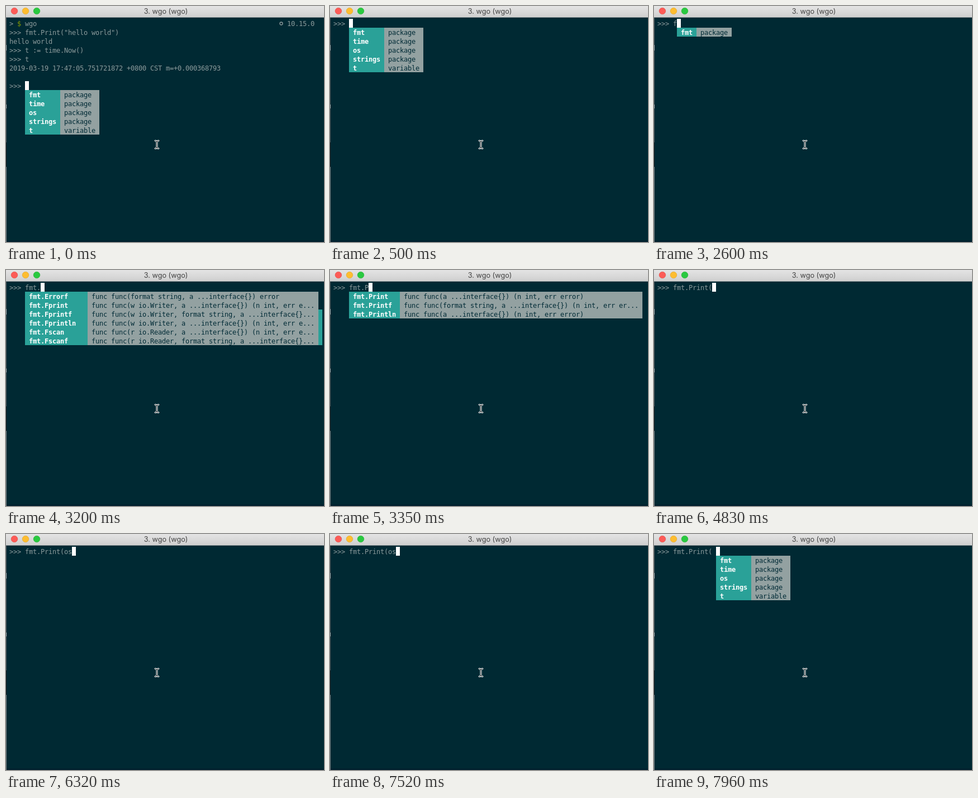
An HTML page that plays this animation: 569 px wide and 424 px high, repeating every 8000 ms.

```html
<!DOCTYPE html>
<html lang="en">
<head>
<meta charset="utf-8">
<title>wgo</title>
<style>
  html, body { margin: 0; width: 100%; height: 100%; overflow: hidden; background: #002933; }
  svg { display: block; }
  #screen text { font: 12px "DejaVu Sans Mono", "Liberation Mono", monospace; white-space: pre; }
  #screen .bold { font-weight: bold; }
  #title { font: 12.7px Inter, "Liberation Sans", sans-serif; }
</style>
</head>
<body>
<svg width="569" height="424" viewBox="0 0 569 424">
  <defs>
    <linearGradient id="bar" x2="0" y2="1">
      <stop stop-color="#e4e4e4"/><stop offset="1" stop-color="#cfcfcf"/>
    </linearGradient>
  </defs>
  <rect width="569" height="424" fill="#002933"/>
  <rect y="421" width="569" height="3" fill="#02212e"/>
  <g id="edge">
    <rect y="20" width="1" height="225" fill="#4c5357"/>
    <rect y="245" width="1" height="44" fill="#15191b"/>
    <rect y="289" width="1" height="135" fill="#7d8486"/>
    <path d="M.5 70v10M.5 177v7" stroke="#b4b8b9"/>
  </g>
  <rect width="569" height="20" fill="url(#bar)"/>
  <rect y="20" width="569" height="1" fill="#7f8a8d"/>
  <g stroke-width=".6">
    <circle cx="15" cy="9" r="5.8" fill="#fc5b57" stroke="#e0443e"/>
    <circle cx="35" cy="9" r="5.8" fill="#fdbd30" stroke="#dea123"/>
    <circle cx="55" cy="9" r="5.8" fill="#29c940" stroke="#1aab29"/>
  </g>
  <text id="title" x="286" y="14" text-anchor="middle" fill="#434343">3. wgo (wgo)</text>
  <g id="screen"></g>
  <g id="pointer" fill="none" stroke-linecap="round">
    <path id="beam" d="M267 242q3 0 3 2.500q0-2.500 3-2.500M270 244.500v9M267 256q3 0 3-2.500q0 2.500 3 2.500" stroke="#fff" stroke-width="2.600"/>
    <use href="#beam"/>
    <path d="M267 242q3 0 3 2.500q0-2.500 3-2.500M270 244.500v9M267 256q3 0 3-2.500q0 2.500 3 2.500" stroke="#10181b" stroke-width="1"/>
  </g>
</svg>
<script>
const LOOP = 8000, CELL_W = 7, CELL_H = 16, LEFT = 6, TOP = 23, COLUMNS = 79;
const GRAY = '#93a1a1', TEAL = '#2aa198', INK = '#002b36', WHITE = '#fff', TEXT = '#8c9b9c';
const screen = document.getElementById('screen');

const px = col => LEFT + col * CELL_W;
const py = row => TOP + row * CELL_H;
const longest = list => Math.max(...list.map(s => s.length));
const escapeText = s => s.replace(/&/g, '&amp;').replace(/</g, '&lt;').replace(/>/g, '&gt;');

function block(col, row, cols, rows, color) {
  return `<rect x="${px(col)}" y="${py(row)}" width="${cols * CELL_W}" height="${rows * CELL_H}" fill="${color}"/>`;
}

// Each character sits on its own terminal cell.
function write(col, row, string, color = TEXT, style = '') {
  const xs = [...string].map((_, i) => px(col + i)).join(' ');
  return `<text class="${style}" x="${xs}" y="${py(row) + 13}" fill="${color}">${escapeText(string)}</text>`;
}

function menu(col, row, { items, nameCols, selected = -1, scrollbar }) {
  const names = items.map(item => item[0]);
  const left = nameCols || longest(names) + 2;
  const limit = COLUMNS - 6 - left;
  const notes = items.map(([, s]) => s.length > limit ? s.slice(0, limit - 3) + '...' : s);
  const right = longest(notes) + 2;
  const start = Math.min(col, COLUMNS - left - right);
  const rows = names.map((name, i) => {
    const on = i === selected, y = row + i;
    return block(start, y, left, 1, on ? GRAY : TEAL) +
      block(start + left, y, right, 1, on ? TEAL : GRAY) +
      write(start + 1, y, name, on ? INK : WHITE, 'bold') +
      write(start + left + 1, y, notes[i], INK);
  });
  if (scrollbar) rows.push(block(start + left + right, row + 2, 1, items.length - 2, TEAL));
  return rows.join('');
}

function promptLine(input, suggestions, row = 0) {
  const col = 4 + input.length;
  return write(0, row, '>>>') + (input ? write(4, row, input) : '') +
    block(col, row, 1, 1, WHITE) +
    (suggestions ? menu(col, row + 1, suggestions) : '');
}

const func = (args, result = '(n int, err error)') => `func func(${args}a ...interface{}) ${result}`;
const FORMAT = 'format string, ', WRITER = 'w io.Writer, ', READER = 'r io.Reader, ';

const scope = { items: [
  ['fmt', 'package'], ['time', 'package'], ['os', 'package'],
  ['strings', 'package'], ['t', 'variable']
] };
const fmtOnly = { items: scope.items.slice(0, 1) };
const members = { nameCols: 16, scrollbar: true, items: [
  ['fmt.Errorf', func(FORMAT, 'error')],
  ['fmt.Fprint', func(WRITER)],
  ['fmt.Fprintf', func(WRITER + FORMAT)],
  ['fmt.Fprintln', func(WRITER)],
  ['fmt.Fscan', func(READER)],
  ['fmt.Fscanf', func(READER + FORMAT)]
] };
const printers = { items: [
  ['fmt.Print', func('')],
  ['fmt.Printf', func(FORMAT)],
  ['fmt.Println', func('')]
] };

const history = [
  '> $ wgo',
  '>>> fmt.Print("hello world")',
  'hello world',
  '>>> t := time.Now()',
  '>>> t',
  '2019-03-19 17:47:05.751721872 +0800 CST m=+0.000368793'
];

function session() {
  return history.map((line, row) => row ? write(0, row, line) : write(0, 0, '>')).join('') +
    write(2, 0, '$', '#859900') + write(4, 0, 'wgo') +
    `<circle cx="492.5" cy="31.500" r="2.500" fill="none" stroke="${TEXT}" stroke-width="1.300"/>` +
    write(71, 0, '10.15.0') + promptLine('', scope, 7);
}

const steps = [
  [0, session],
  [500, '', scope],
  [2600, 'f', fmtOnly],
  [2750, 'fmt', fmtOnly],
  [3200, 'fmt.', members],
  [3350, 'fmt.P', printers],
  [3490, 'fmt.Pr', printers],
  [3640, 'fmt.Pri', printers],
  [3790, 'fmt.Prin', printers],
  [3930, 'fmt.Print', { ...printers, selected: 0 }],
  [4830, 'fmt.Print('],
  [6320, 'fmt.Print(os'],
  [6470, 'fmt.Print(os.'],
  [7520, 'fmt.Print(os'],
  [7660, 'fmt.Print(o'],
  [7810, 'fmt.Print('],
  [7960, 'fmt.Print( ', scope]
];

let shown;
function draw(time) {
  const step = steps.filter(([at]) => at <= time).pop();
  if (step === shown) return;
  shown = step;
  const [, input, suggestions] = step;
  screen.innerHTML = typeof input === 'function' ? input() : promptLine(input, suggestions);
}

const began = performance.now();
function tick() {
  draw((performance.now() - began) % LOOP);
  requestAnimationFrame(tick);
}
tick();
</script>
</body>
</html>
```
